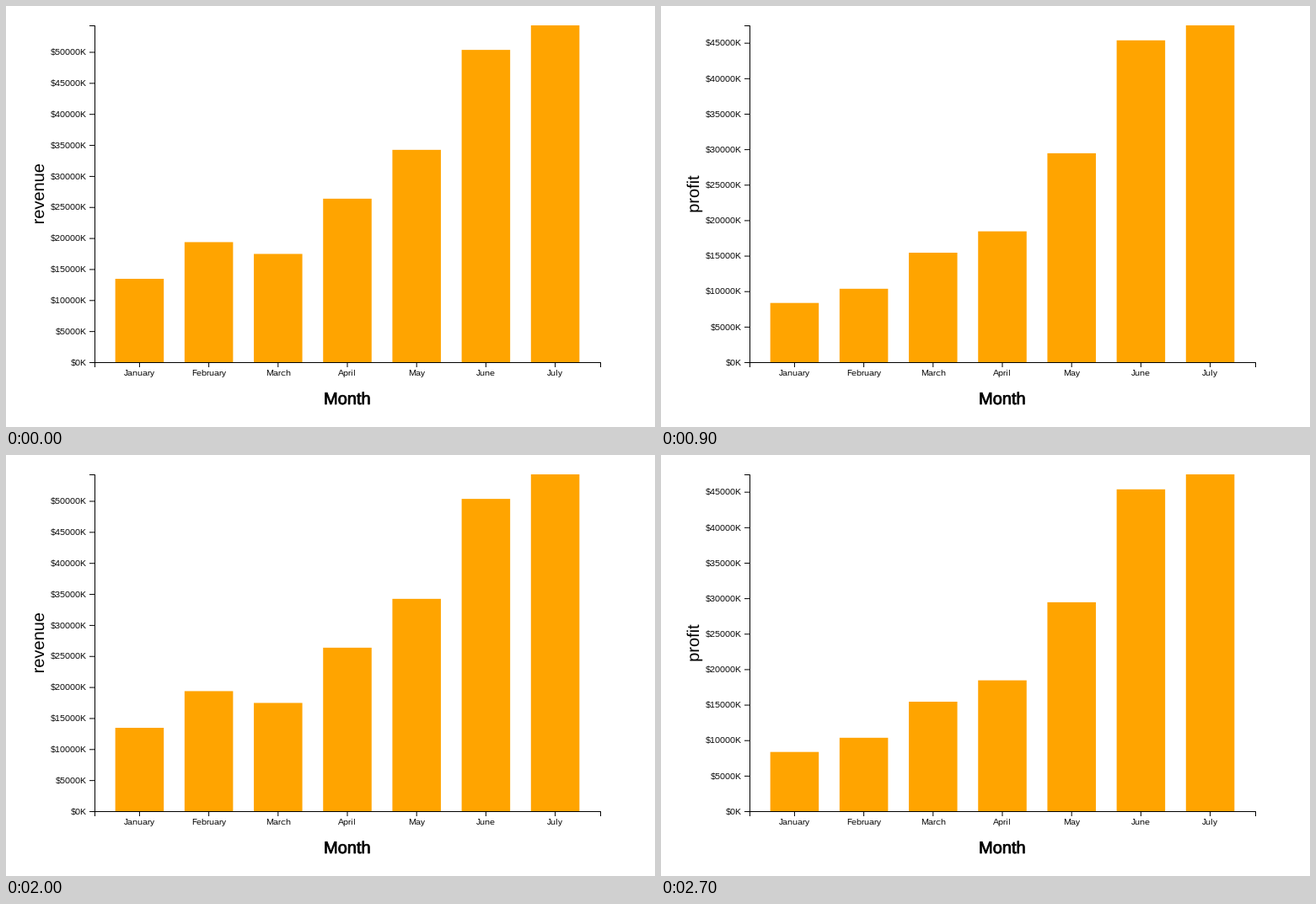
These frames come from a looping animation (770 px wide and 500 px high, 2.8 s). A matplotlib script:

```python
import matplotlib.pyplot as plt
from matplotlib.animation import FuncAnimation
from matplotlib.collections import LineCollection
from matplotlib.patches import PathPatch, Polygon, Rectangle
from matplotlib.textpath import TextPath
from matplotlib.transforms import Affine2D

# Whole-pixel glyph hinting, like small browser text
plt.rcParams.update({
    "font.family": "Liberation Sans",
    "text.hinting": "native",
    "text.hinting_factor": 1,
})

W, H, DPI = 770, 500, 100
PX = 72 / DPI
FRAMES, STEP = 28, 100
HOLD = 10  # frames between toggles; the first falls half a hold in

LEFT, TOP, WIDTH, HEIGHT = 105, 23, 600, 400
BASE, RIGHT = TOP + HEIGHT, LEFT + WIDTH
MONTHS = "January February March April May June July".split()
DATA = {
    "revenue": [13432, 19342, 17443, 26342, 34213, 50321, 54273],
    "profit": [8342, 10342, 15423, 18432, 29434, 45343, 47452],
}
TICK = 5000
PAD = 0.3
BAND = WIDTH / (len(MONTHS) + PAD)
BAR = BAND * (1 - PAD)
ARROW = [(0, 0), (0, 16), (4, 13), (6, 19), (9, 18), (6, 12), (11, 12)]

fig = plt.figure(figsize=(W / DPI, H / DPI), dpi=DPI, facecolor="white")
ax = fig.add_axes([0, 0, 1, 1])
ax.set_xlim(0, W)
ax.set_ylim(H, 0)
ax.axis("off")


def label(x, y, text="", ha="center"):
    return ax.text(x, y, text, fontsize=10 * PX, ha=ha, va="baseline")


def heading(x, y, text, angle=0, weight=0):
    """Unhinted 20 px text centred on x, y along its baseline."""
    path = TextPath((0, 0), text, size=20)
    box = path.get_extents()
    place = (Affine2D().translate(-(box.x0 + box.x1) / 2, 0)
             .scale(1, -1).rotate_deg(-angle).translate(x, y))
    patch = PathPatch(place.transform_path(path), facecolor="black",
                      edgecolor="black", linewidth=weight * PX)
    patch.set_snap(False)
    return ax.add_patch(patch)


def strokes(segments=()):
    lines = LineCollection(list(segments), colors="black", linewidths=PX)
    lines.set_snap(False)
    return ax.add_collection(lines, autolim=False)


def y_pos(value, top):
    return BASE - HEIGHT * value / top


bars, x_ticks = [], []
for i, month in enumerate(MONTHS):
    x = LEFT + BAND * (i + PAD)
    mid = x + BAR / 2
    bar = Rectangle((x, BASE), BAR, 0, facecolor="#ffa400", linewidth=0)
    bar.set_snap(False)
    bars.append(ax.add_patch(bar))
    x_ticks.append([(mid, BASE), (mid, BASE + 6)])
    label(mid, BASE + 16, month)

x0, x1, y0, y1 = (v + 0.5 for v in (LEFT, RIGHT, TOP, BASE))
strokes(x_ticks + [
    [(x0, BASE + 6), (x0, y1), (x1, y1), (x1, BASE + 6)],
    [(LEFT - 6, y1), (x0, y1), (x0, y0), (LEFT - 6, y0)],
])
y_ticks = strokes()
y_labels = [label(LEFT - 9, BASE, rf"\${TICK * i}K", "right")
            for i in range(max(DATA["revenue"]) // TICK + 1)]

heading((LEFT + RIGHT) / 2, BASE + 50, "Month", weight=0.8)
titles = {name: heading(LEFT - 60, (TOP + BASE) / 2, name, angle=90)
          for name in DATA}

cursor = ax.add_patch(Polygon(ARROW, closed=True, facecolor="white",
                              edgecolor="black", linewidth=PX, zorder=5))


def update(n):
    name = ("revenue", "profit")[(n + HOLD // 2) // HOLD % 2]
    values = DATA[name]
    top = max(values)
    for key, title in titles.items():
        title.set_visible(key == name)

    for bar, value in zip(bars, values):
        bar.set_y(y_pos(value, top))
        bar.set_height(HEIGHT * value / top)

    segments = []
    for i, text in enumerate(y_labels):
        y = y_pos(TICK * i, top) + 0.5
        text.set_visible(y > TOP)
        text.set_y(round(y + 3.2))
        if y > TOP:
            segments.append([(LEFT - 6, y), (LEFT, y)])
    y_ticks.set_segments(segments)

    # The pointer rises from the bottom edge, rests, and drops back
    drop = max(0, abs(n - 3.5) - 1.5)
    cursor.set_visible(drop <= 1)
    cursor.set_xy([(740.5 + x + drop, 457.5 + y + 28 * drop)
                   for x, y in ARROW])
    return []


anim = FuncAnimation(fig, update, frames=FRAMES, interval=STEP,
                     init_func=lambda: update(0), repeat=True,
                     repeat_delay=0)
plt.show()
```
